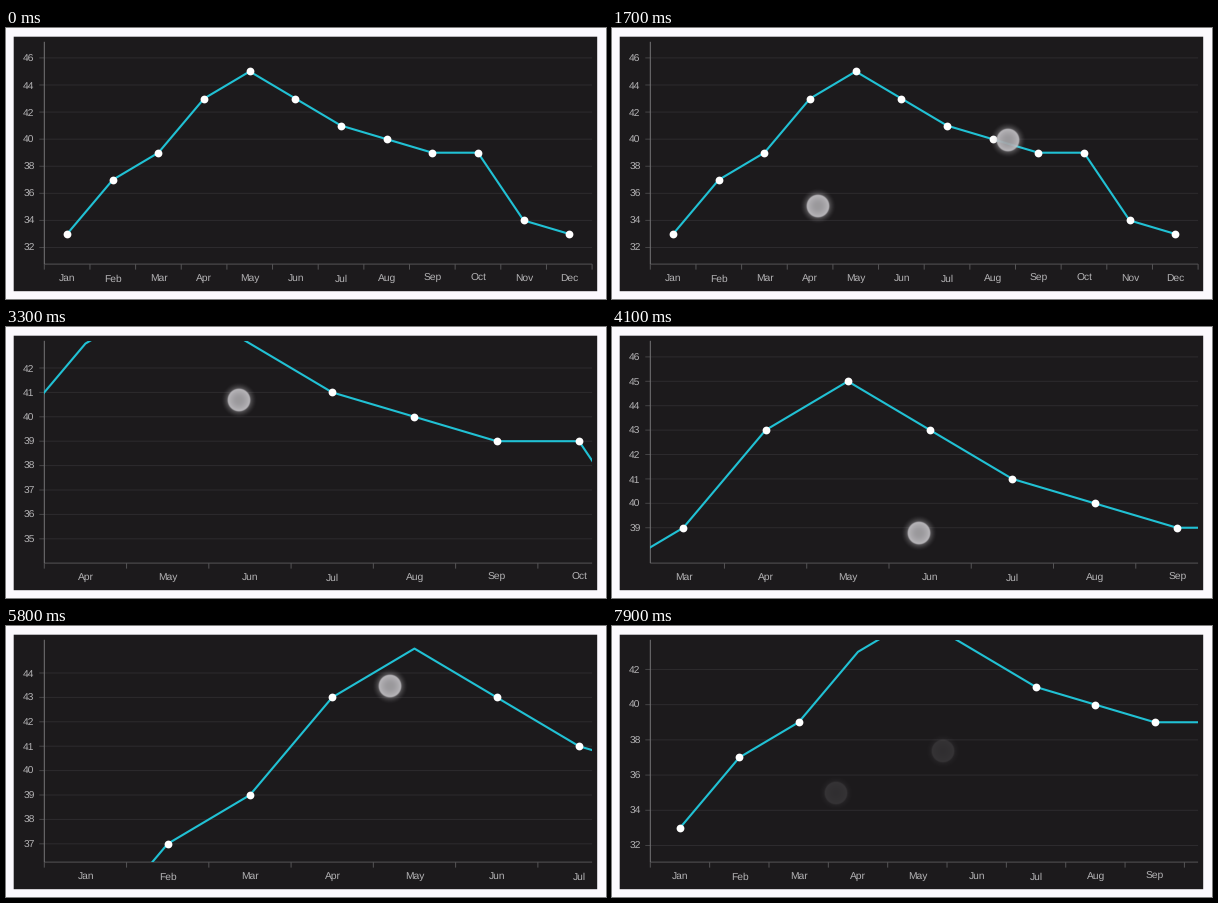
Animation of 600 by 271 pixels, one loop 8 s. Source, as a matplotlib script:

```python
import numpy as np
import matplotlib.pyplot as plt
from matplotlib.animation import FuncAnimation
from matplotlib.collections import LineCollection
from matplotlib.patches import Rectangle

W, H, DPI = 600, 271, 100
FRAMES, STEP_MS = 80, 100
PX = 72 / DPI

LEFT, RIGHT, TOP, BOTTOM = 38.3, 586.1, 13.8, 236.1
Y_MAX, Y_MIN = 29.9, 219.5          # padded value range inside the plot
LOW, HIGH = 32, 46
COL = (RIGHT - LEFT) / 12
UNIT = (Y_MIN - Y_MAX) / (HIGH - LOW)
ZOOM, ZOOM_OUT = 1.802, 1.3
PAN_X, PAN_Y = 3.0, 2.685           # window offset once zoomed in
PAN_TOP = HIGH - (HIGH - LOW) / ZOOM

MONTHS = "Jan Feb Mar Apr May Jun Jul Aug Sep Oct Nov Dec".split()
VALUES = np.array([33, 37, 39, 43, 45, 43, 41, 40, 39, 39, 34, 33])

plt.rcParams["font.family"] = "Liberation Sans"
plt.rcParams["text.hinting"] = "none"
fig = plt.figure(figsize=(W / DPI, H / DPI), dpi=DPI, facecolor="#fbf9fd")
ax = fig.add_axes([0, 0, 1, 1])
ax.axis("off")


def ease(t, start, end):
    u = np.clip((t - start) / (end - start), 0, 1)
    return u * u * (3 - 2 * u)


def fade(t, a, b, c, d):
    """Opacity rising over a..b and falling over c..d."""
    return float(np.interp(t, [a, b, c, d], [0, 1, 1, 0]))


def view(t):
    """Zoom factor, first visible category and lowest visible value."""
    if t < 7300:
        s = 1 + (ZOOM - 1) * ease(t, 1800, 2700)
    else:
        s = ZOOM - (ZOOM - ZOOM_OUT) * ease(t, 7300, 7800)
    if t < 3400:
        k = (1 - 1 / s) / (1 - 1 / ZOOM)
        return s, PAN_X * k, LOW + PAN_Y * k
    left = PAN_X * (1 - ease(t, 3400, 5325))
    if t < 5500:
        drag = 133 * ease(t, 3400, 4100) / (UNIT * ZOOM)
        return s, left, min(LOW + PAN_Y + drag, PAN_TOP)
    return s, left, PAN_TOP - (PAN_TOP - LOW) * ease(t, 5500, 6520)


def fingers(t):
    """Position and opacity of each touch dot."""
    s, left, lo = view(t)
    spots = []
    pinch = fade(t, 1200, 1600, 2700, 2950)
    for x, y in ((206, 178.5), (395.5, 112)):
        spots.append((346 + (x - 346) * s, 138 + (y - 138) * s, pinch))
    spots.append((233 + (PAN_X - left) * COL * ZOOM,
                  73 + 133 * ease(t, 3400, 4100),
                  fade(t, 3000, 3250, 5250, 5500)))
    spots.append((383.5, 92 - 152 * ease(t, 5500, 6520),
                  fade(t, 5350, 5550, 5850, 6100)))
    spread = (1 if t < 7300 else s / ZOOM) * ZOOM / ZOOM_OUT
    close = fade(t, 7120, 7320, 7700, 7940)
    for dx, dy in ((-53.5, 21), (53.5, -21)):
        spots.append((277 + dx * spread, 146 + dy * spread, close))
    return spots


def dot_image(size=160, reach=20):
    g = np.linspace(-reach, reach, size)
    r = np.hypot(*np.meshgrid(g, g))
    shade = 0.64 + 0.13 * np.clip(r / 11, 0, 1) ** 2
    body = np.clip(11.8 - r, 0, 1)
    glow = 0.36 * np.clip((18.5 - r) / 7.5, 0, 1) ** 1.8
    img = np.ones((size, size, 4))
    img[..., :3] = (shade * body + 0.82 * (1 - body))[..., None]
    img[..., :3] *= (1, 0.99, 1.01)
    img[..., 3] = 0.94 * body + glow * (1 - body)
    return img


def segments(color, z, segs=()):
    return ax.add_collection(LineCollection(
        segs, colors=color, linewidths=PX, zorder=z, snap=False))


def label(text, x, y, ha):
    return ax.text(x, y, text, fontsize=10.3 * PX, color="#b4b3b5",
                   ha=ha, va="baseline", zorder=4)


ax.add_patch(Rectangle((7.7, 8.7), 583.5, 254.5, color="#1c1a1c", lw=0,
                       zorder=0, snap=False))
grid = segments("#2d2b2e", 1)
y_ticks = segments("#454446", 2)
x_ticks = segments("#555456", 2)
segments("#555456", 3, [[(LEFT, BOTTOM), (RIGHT, BOTTOM)]])
segments("#757476", 3, [[(LEFT, TOP), (LEFT, BOTTOM)]])

clip = Rectangle((LEFT, TOP), RIGHT - LEFT, BOTTOM - TOP,
                 transform=ax.transData)
curve, = ax.plot([], [], color="#21c1d4", lw=2.1 * PX, zorder=5,
                 solid_joinstyle="round")
curve.set_clip_path(clip)
marks, = ax.plot([], [], "o", color="white", ms=7.8 * PX, mew=0, zorder=6,
                 snap=False)

x_labels = [label(m, 0, 254 if m in ("Feb", "Jul") else 253.2, "center")
            for m in MONTHS]
y_labels = {v: label(str(v), 28.6, 0, "right") for v in range(LOW, HIGH + 1)}
dot = dot_image()
dots = [ax.imshow(dot, extent=(0, 1, 1, 0), interpolation="bilinear",
                  zorder=8, aspect="auto") for _ in range(6)]


def draw(i):
    t = i * STEP_MS
    s, left, lo = view(t)

    def px(c):
        return LEFT + (c - left) * COL * s

    def py(v):
        return Y_MIN - (v - lo) * UNIT * s

    xs, ys = px(np.arange(12) + 0.5), py(VALUES)
    curve.set_data(xs, ys)
    shown = ((xs >= LEFT) & (xs <= RIGHT)
             & (ys >= Y_MAX - .1) & (ys <= Y_MIN + .1))
    marks.set_data(xs[shown], ys[shown])

    rows = []
    step = 1 if UNIT * s > 20 else 2
    for v, text in y_labels.items():
        y = py(v)
        on = v % step == 0 and Y_MAX - .1 <= y <= Y_MIN + .1
        text.set_visible(on)
        text.set_y(y + 3.7)
        if on:
            rows.append(y)
    grid.set_segments([[(LEFT, y), (RIGHT, y)] for y in rows])
    y_ticks.set_segments([[(LEFT - 5, y), (LEFT, y)] for y in rows])

    edges = [x for x in px(np.arange(13)) if LEFT - .1 <= x <= RIGHT + .1]
    x_ticks.set_segments([[(x, BOTTOM), (x, BOTTOM + 5.5)] for x in edges])
    for x, text in zip(xs, x_labels):
        text.set_visible(LEFT <= x <= RIGHT)
        text.set_x(x + .3)

    for spot, (x, y, alpha) in zip(dots, fingers(t)):
        spot.set_visible(alpha > 0)
        spot.set_alpha(alpha)
        spot.set_extent((x - 20, x + 20, y + 20, y - 20))
    ax.set_xlim(0, W)
    ax.set_ylim(H, 0)
    return []


anim = FuncAnimation(fig, draw, frames=FRAMES, interval=STEP_MS,
                     repeat=True, repeat_delay=0, blit=False)
plt.show()
```
